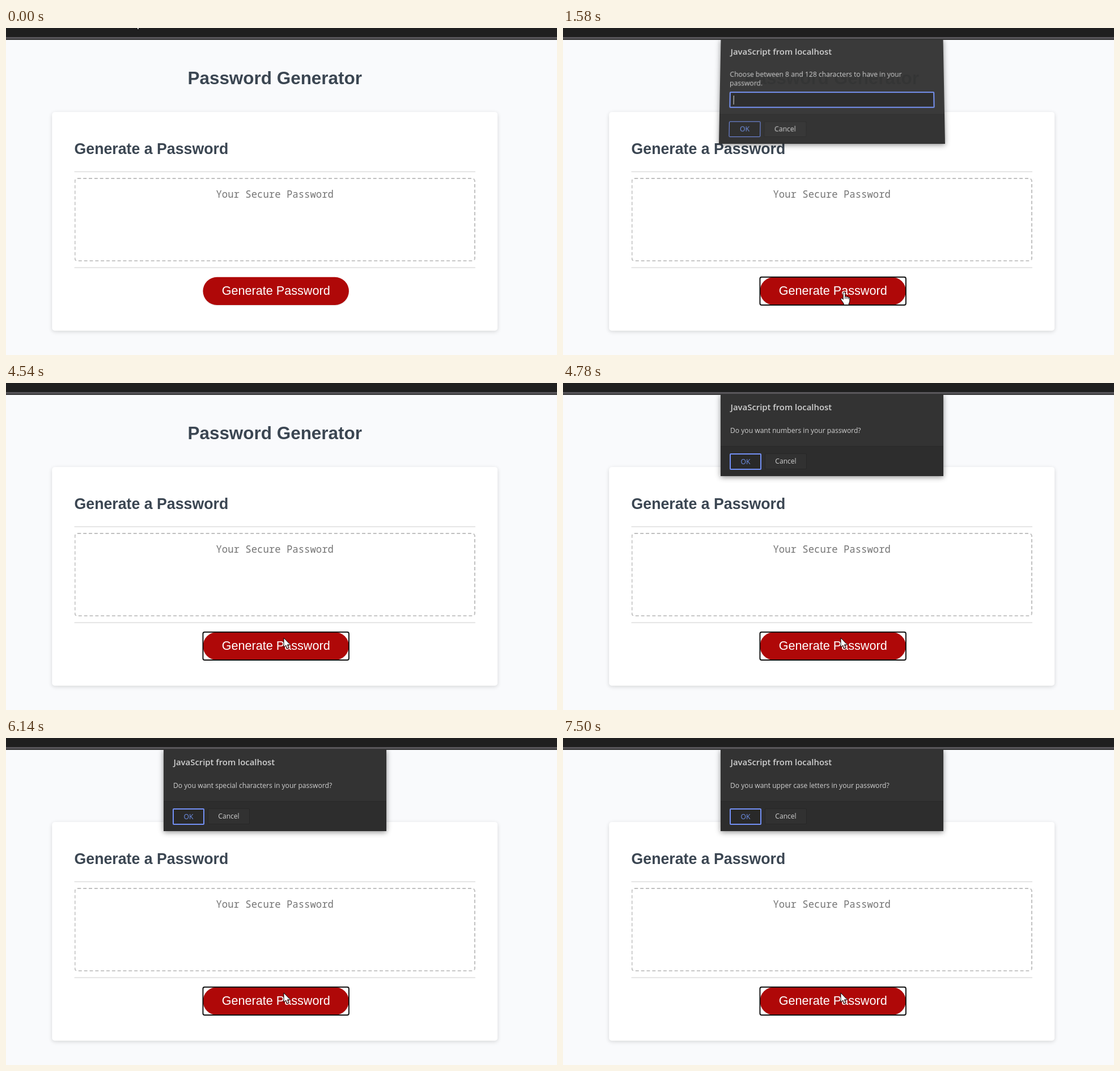
An HTML page for the animation above (8000 ms loop, 972x576 px).

```html
<!DOCTYPE html>
<html lang="en">
<head>
<meta charset="utf-8">
<title>Password Generator</title>
<style>
html, body { margin: 0; width: 100%; height: 100%; overflow: hidden; background: #f9fafc; }
div, svg { position: absolute; box-sizing: border-box; }
svg { left: 0; top: 0; overflow: visible; }
#stage { left: 0; top: 0; width: 972px; height: 576px; overflow: hidden; }
#bar { width: 972px; height: 21px; background: linear-gradient(#1f1f1f 16.5px, #59575b 16.5px 19px, #333334 19px); }
#page { left: 0; top: 0; width: 800px; height: 392px; transform-origin: 0 0; transform: translate(81.2px, 148px) scale(.9825);
  font-family: "Liberation Sans", Arial, sans-serif; }
#card { width: 800px; height: 392px; border-radius: 5px; background: #fff; box-shadow: 0 2px 8px rgba(0,0,0,.15); }
.rule { left: 40px; width: 720px; height: 2px; background: #e5e5e5; }
#field { left: 40px; top: 118px; width: 720px; height: 150px; border: 2px dashed #bfbfbf; border-radius: 6px; }
#button { left: 271px; top: 296px; width: 262px; height: 50px; border-radius: 25px; background: #af0808;
  box-shadow: 0 1px 1px rgba(0,0,0,.12); }
#ring { left: 270px; top: 295px; width: 264px; height: 52px; border: 2px solid #101010; border-radius: 4px; }
#view { left: 0; top: 21px; width: 972px; height: 555px; overflow: hidden; }
#dialog { left: 278px; top: -1px; width: 393px; background: #333; color: #d0d0d0; transform-origin: 50% 0;
  box-shadow: 0 2px 9px rgba(0,0,0,.45); font: 12.1px/15.6px "Open Sans", "Noto Sans", sans-serif; white-space: pre; }
#title { left: 17.5px; top: 12px; font-weight: 600; font-size: 14.9px; line-height: 20px; }
#message { left: 17px; top: 56px; }
#input { left: 17px; top: 95px; width: 359px; height: 29px; border: 2px solid #7390f5; border-radius: 2px;
  background: #272727; padding-left: 5px; line-height: 27px; }
#caret { top: 5px; width: 1px; height: 16px; background: #e0e0e0; }
#footer { bottom: 0; width: 393px; height: 53px; background: #2d2d2d; border-top: 1px solid #292929; }
.key { top: 12px; height: 28px; line-height: 26px; border: 1px solid #272727; border-radius: 2px; background: #313131; text-align: center; }
#ok { left: 17px; width: 55px; border-color: #7390f5; color: #6f90e8; background: #292929; }
.confirm #ok { left: 16px; width: 56px; height: 29px; border-width: 2px; line-height: 25px; }
#cancel { left: 78px; width: 74px; }
</style>
</head>
<body>
<div id="stage">
  <div id="bar"></div>
  <div id="page">
    <div id="card"></div>
    <div class="rule" style="top:106px"></div>
    <div class="rule" style="top:278px"></div>
    <div id="field"></div>
    <div id="button"></div>
    <div id="ring"></div>
    <svg width="800" height="392" text-anchor="middle">
      <g font-weight="bold" fill="#3b4652">
        <text x="400" y="-50" font-size="32">Password Generator</text>
        <text x="40" y="75.8" font-size="27.2" text-anchor="start">Generate a Password</text>
      </g>
      <text x="400" y="153.2" font-size="17.6" fill="#757575"
        font-family="Noto Sans Mono, DejaVu Sans Mono, monospace">Your Secure Password</text>
      <text x="402" y="327.7" font-size="22" fill="#fff">Generate Password</text>
    </svg>
  </div>
  <div id="view">
    <div id="dialog">
      <div id="title">JavaScript from localhost</div>
      <div id="message"></div>
      <div id="input"><span id="typed"></span><div id="caret"></div></div>
      <div id="footer"><div class="key" id="ok">OK</div><div class="key" id="cancel">Cancel</div></div>
    </div>
  </div>
  <svg width="972" height="576">
    <g id="cursor" fill="#fff" stroke="#000" stroke-linejoin="round">
      <path id="arrow" d="M0 0V16.5L3.8 13L6.2 18.8L8.8 17.7L6.4 12H11.5Z"/>
      <path id="hand" d="M-1.8 13.2V1.8a1.8 1.8 0 0 1 3.6 0V8q1.8-1 3 .6q1.8-.8 2.8 .8q2.2-.4 2.2 1.8v4.6q0 2.6-1.6 4.4v2.6H-.8v-2.4l-4.6-6.6q-1.2-2.6 1-2.8q1.2 0 2.6 2.2zM1.8 8v4M4.8 8.6v3.6M7.6 9.4v3"/>
    </g>
  </svg>
</div>
<script>
const $ = id => document.getElementById(id);
const show = (id, on) => $(id).style.display = on ? '' : 'none';
const within = (t, a, b) => t >= a && t < b;
const clamp = v => Math.min(1, Math.max(0, v));
const mix = (a, b, p) => a + (b - a) * p;

const dialogs = [
  { from: 1460, to: 4540, prompt: true, text: 'Choose between 8 and 128 characters to have in your\npassword.' },
  { from: 4600, to: 5950, text: 'Do you want numbers in your password?' },
  { from: 5950, to: 7260, text: 'Do you want special characters in your password?' },
  { from: 7310, to: 8000, text: 'Do you want upper case letters in your password?' }
];

// Swings the dialog down from its top edge; tilt runs from 1 (folded) to 0 (flat).
function pose(height, tilt) {
  const top = 1 - .059 * tilt ** 1.8;
  const flare = 1 + .1057 * tilt;
  const squash = Math.cos(tilt * 70.4 * Math.PI / 180) / flare;
  const depth = (1 / flare - 1) / height;
  return `matrix3d(${top},0,0,0, 0,${squash},0,${depth}, 0,0,1,0, 0,0,0,1)`;
}

function drawDialog(t) {
  const d = dialogs.find(d => within(t, d.from, d.to));
  show('dialog', d);
  if (!d) return;
  const height = d.prompt ? 188 : 144;
  const tilt = clamp(1 - Math.floor((t - d.from) / 60) * 60 / 144);
  const style = $('dialog').style;
  style.height = height + 'px';
  style.opacity = 1 - .52 * tilt ** 1.6;
  style.transform = tilt ? pose(height, tilt) : 'none';
  $('dialog').className = d.prompt ? '' : 'confirm';
  $('message').textContent = d.text;
  show('input', d.prompt);
  const typed = t < 2680 ? '' : t < 4100 ? '9' : '90';
  $('typed').textContent = typed;
  $('caret').style.left = 5 + typed.length * 6.92 + 'px';
  show('caret', t < 2060 || within(t, 2610, 3230) || t >= 3730);
}

function drawCursor(t) {
  let p = clamp((t - 790) / 550);
  p = p * p * (3 - 2 * p);
  const q = clamp((t - 1700) / 240);
  const x = mix(mix(226, 496, p), 490, q);
  const y = mix(mix(-16, 465, p), 449, q);
  const over = y >= 439 && t < 1700;
  show('hand', over);
  show('arrow', !over);
  $('cursor').setAttribute('transform', `translate(${x} ${y})`);
}

function frame() {
  const t = performance.now() % 8000;
  show('ring', t >= 1400);
  drawDialog(t);
  drawCursor(t);
  requestAnimationFrame(frame);
}
frame();
</script>
</body>
</html>
```
